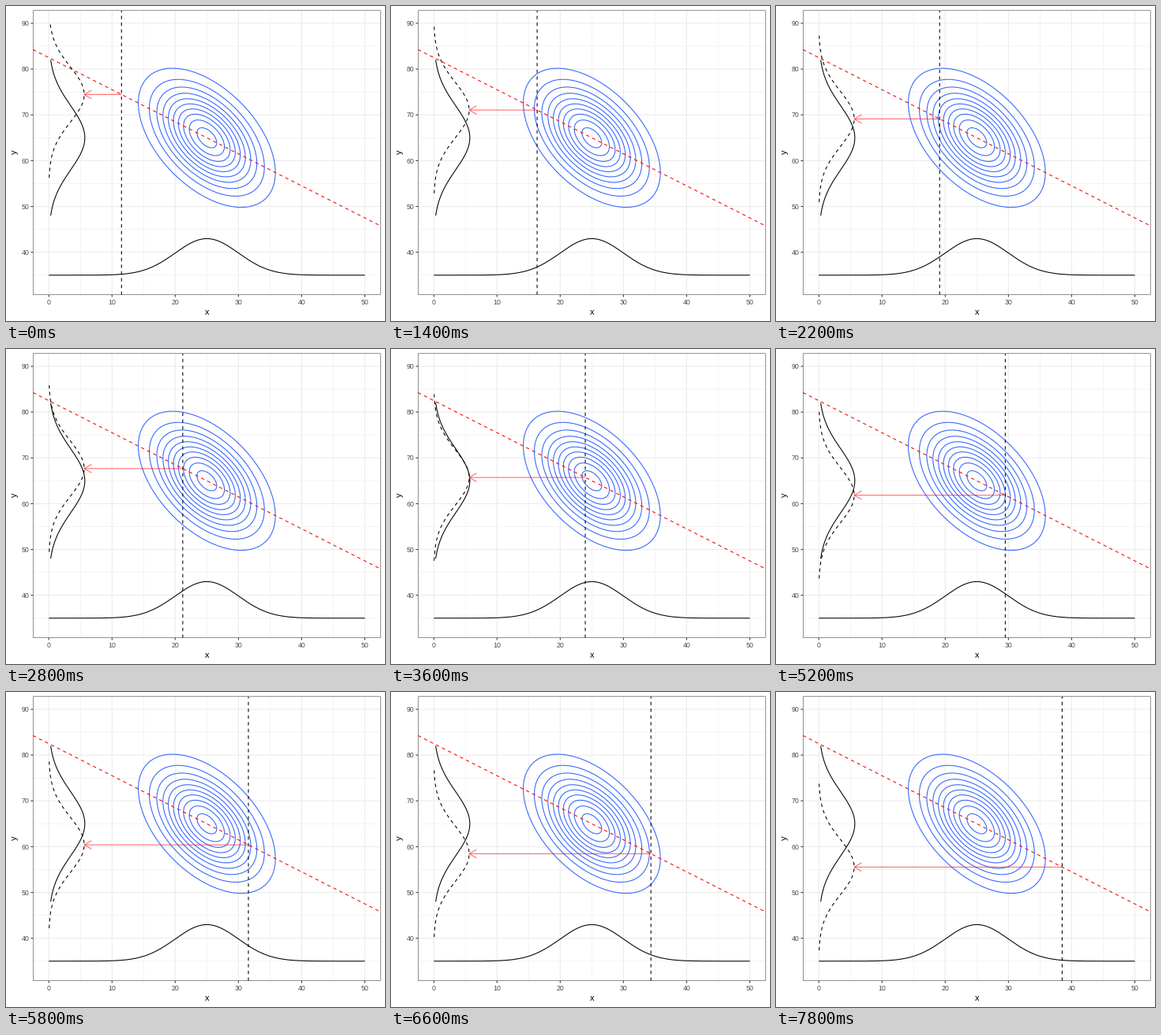
These frames come from a looping animation (480 px wide and 400 px high, 8 s). A matplotlib script:

```python
import numpy as np
import matplotlib.pyplot as plt
from matplotlib.animation import FuncAnimation

W, H, DPI = 480, 400, 100
PT = 72 / DPI                       # points per pixel
LEFT, RIGHT, TOP, BOTTOM = 34.2, 474.5, 5.5, 366.75
XLIM, YLIM = (-2.5, 52.5), (30.71, 92.83)
SX = (RIGHT - LEFT) / (XLIM[1] - XLIM[0])
SY = (BOTTOM - TOP) / (YLIM[1] - YLIM[0])

FRAMES, INTERVAL = 40, 200
X_START, X_END = 11.5, 38.5

# Bivariate normal
MX, MY, SDX, SDY, RHO = 25, 65, 5, 7, -0.5
SLOPE = RHO * SDY / SDX
SD_COND = SDY * np.sqrt(1 - RHO ** 2)
PEAK_COND = 5.6

LINE_PX = 0.5 * 72.27 / 25.4 * 0.75   # half a millimetre stroke
LINE = LINE_PX * PT
DASH = (0, (4, 4))

plt.rcParams["font.family"] = "Liberation Sans"
fig = plt.figure(figsize=(W / DPI, H / DPI), dpi=DPI, facecolor="white")
ax = fig.add_axes([LEFT / W, 1 - BOTTOM / H, (RIGHT - LEFT) / W, (BOTTOM - TOP) / H])
ax.set(xlim=XLIM, ylim=YLIM, xticks=[], yticks=[])
ax.spines[:].set_visible(False)
ax.patch.set_visible(False)


def stroke(x, y, color="black", width=LINE, **kw):
    return ax.plot(x, y, color=color, lw=width, snap=False,
                   solid_capstyle="butt", **kw)[0]


def normal(v, mean, sd):
    return np.exp(-0.5 * ((v - mean) / sd) ** 2) / (sd * np.sqrt(2 * np.pi))


def regression(x):
    return MY + SLOPE * (x - MX)


def label(x, y, text, size, color, **kw):
    fig.text(x / W, 1 - y / H, text, fontsize=size * PT, color=color,
             va="baseline", **kw)


def draw_grid():
    for start, width in ((5, LINE / 2), (0, LINE)):
        for x in range(start, 51, 10):
            stroke([x, x], YLIM, "#ebebeb", width)
        for y in range(40 - start, 91, 10):
            stroke(XLIM, [y, y], "#ebebeb", width)


def draw_axes():
    tick = 2.75
    for x in range(0, 51, 10):
        stroke([x, x], [YLIM[0], YLIM[0] - tick / SY], "#333333", clip_on=False)
        label(LEFT + (x - XLIM[0]) * SX, 379.0, str(x), 8.8, "#4d4d4d", ha="center")
    for y in range(40, 91, 10):
        stroke([XLIM[0], XLIM[0] - tick / SX], [y, y], "#333333", clip_on=False)
        label(29.25, TOP + (YLIM[1] - y) * SY + 3.1, str(y), 8.8, "#4d4d4d", ha="right")
    label((LEFT + RIGHT) / 2, 391.5, "x", 11, "black", ha="center")
    label(14.2, 185.5, "y", 11, "black", ha="center",
          rotation=90, rotation_mode="anchor")


def draw_border():
    # Only the inner half of the stroke shows.
    dx, dy = LINE_PX / 4 / SX, LINE_PX / 4 / SY
    x0, x1 = XLIM[0] + dx, XLIM[1] - dx
    y0, y1 = YLIM[0] + dy, YLIM[1] - dy
    stroke([x0, x1, x1, x0, x0], [y0, y0, y1, y1, y0], "#333333", LINE / 2,
           zorder=10, clip_on=False)


def draw_contours():
    top = 1 / (2 * np.pi * SDX * SDY * np.sqrt(1 - RHO ** 2))
    t = np.linspace(0, 2 * np.pi, 181)
    u, v = np.cos(t), RHO * np.cos(t) + np.sqrt(1 - RHO ** 2) * np.sin(t)
    for level in np.arange(1, 11) * 0.0005:
        r = np.sqrt(2 * np.log(top / level))
        stroke(MX + SDX * r * u, MY + SDY * r * v, "#3366ff")


draw_grid()
draw_axes()
draw_border()
draw_contours()

xs = np.linspace(0, 50, 201)
stroke(xs, 35 + 100 * normal(xs, MX, SDX))
ys = np.linspace(48, 82, 171)
stroke(100 * normal(ys, MY, SDY), ys)
ends = np.array(XLIM)
stroke(ends, regression(ends), "red", ls=DASH)

cut = stroke([], [], ls=DASH)
cond = stroke([], [], ls=DASH)
shaft = stroke([], [], "red", alpha=0.6)
head = stroke([], [], "red", alpha=0.6, solid_joinstyle="miter")
z = np.linspace(-3, 3, 101)
HEAD_X, HEAD_Y = 9.35 / SX, 5.4 / SY


def update(i):
    x = X_START + (X_END - X_START) * i / (FRAMES - 1)
    mean = regression(x)
    y = mean + SD_COND * z
    keep = y <= 90
    cut.set_data([x, x], YLIM)
    cond.set_data(PEAK_COND * np.exp(-z[keep] ** 2 / 2), y[keep])
    shaft.set_data([x, PEAK_COND], [mean, mean])
    back = PEAK_COND + HEAD_X
    head.set_data([back, PEAK_COND, back], [mean + HEAD_Y, mean, mean - HEAD_Y])
    return cut, cond, shaft, head


anim = FuncAnimation(fig, update, frames=FRAMES, interval=INTERVAL,
                     repeat=True, repeat_delay=0)
plt.show()
```
